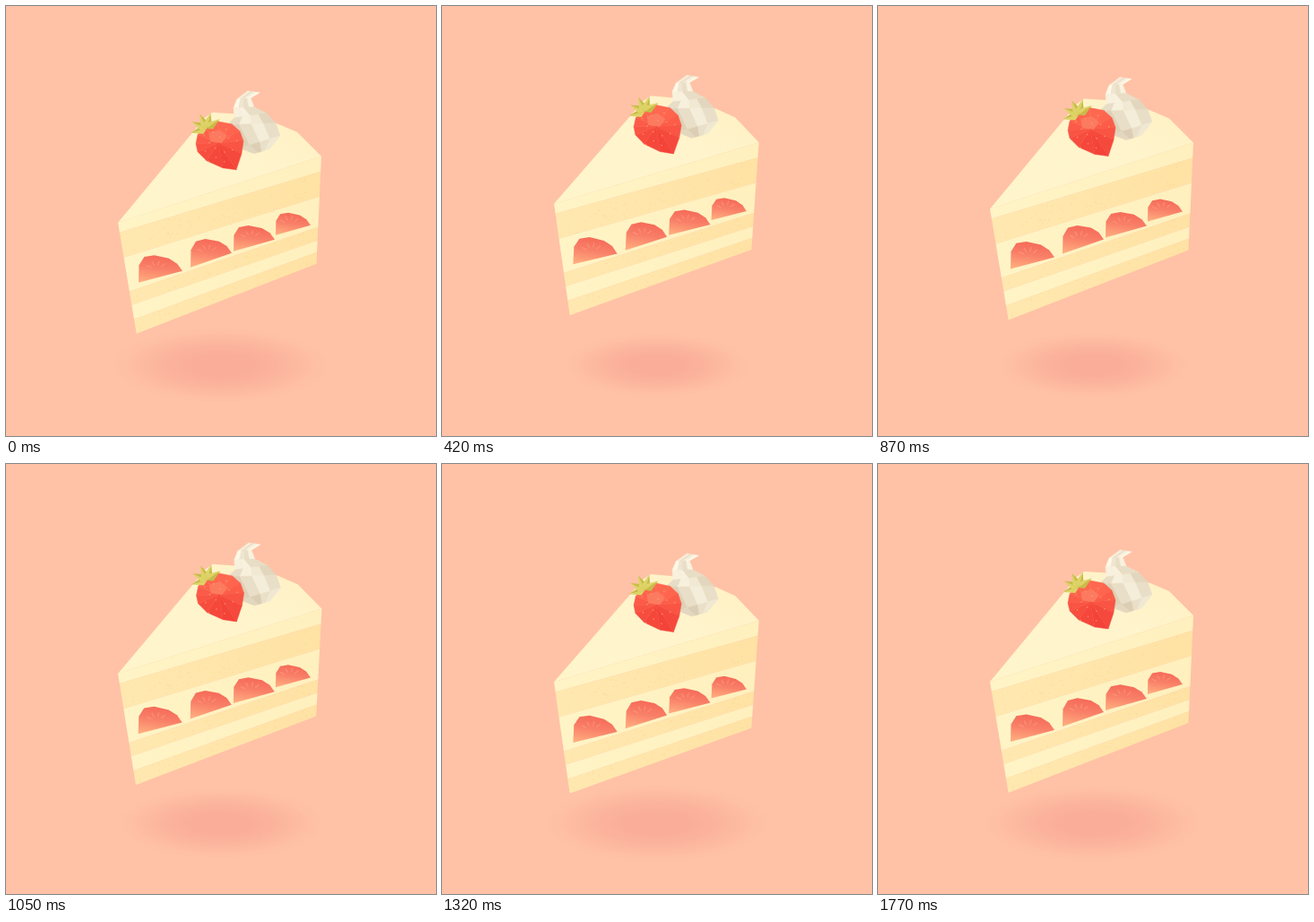
Write an HTML page that moves like this. It is 480 by 480 pixels and loops after 1800 ms.

```html
<!DOCTYPE html>
<html lang="en">
<head>
<meta charset="utf-8">
<title>Floating cake</title>
<style>
  html, body { margin: 0; width: 100%; height: 100%; overflow: hidden; background: #ffc2a6; }
  svg { display: block; width: 100%; height: 100%; }
</style>
</head>
<body>
<svg viewBox="0 0 480 480">
  <defs>
    <radialGradient id="shade">
      <stop offset="0" stop-color="#faad99"/>
      <stop offset=".3" stop-color="#faad99" stop-opacity=".94"/>
      <stop offset=".5" stop-color="#faad99" stop-opacity=".75"/>
      <stop offset=".7" stop-color="#faad99" stop-opacity=".42"/>
      <stop offset=".85" stop-color="#faad99" stop-opacity=".15"/>
      <stop offset="1" stop-color="#faad99" stop-opacity="0"/>
    </radialGradient>
    <linearGradient id="top" x1="0" y1="1" x2="1" y2="0">
      <stop offset="0" stop-color="#fff5cb"/>
      <stop offset=".6" stop-color="#fff4cc"/>
      <stop offset="1" stop-color="#fff0c3"/>
    </linearGradient>
    <linearGradient id="cream">
      <stop offset="0" stop-color="#fff4c6"/>
      <stop offset="1" stop-color="#fff0be"/>
    </linearGradient>
    <linearGradient id="sponge">
      <stop offset="0" stop-color="#ffe8b0"/>
      <stop offset="1" stop-color="#ffe2a4"/>
    </linearGradient>
    <linearGradient id="slice" x1=".6" y1="0" x2=".4" y2="1">
      <stop offset="0" stop-color="#f56857"/>
      <stop offset=".5" stop-color="#f98068"/>
      <stop offset="1" stop-color="#ffab7e"/>
    </linearGradient>
  </defs>
  <ellipse id="shadow" cx="240" cy="401" fill="url(#shade)"/>
  <g id="cake"></g>
</svg>
<script>
const LOOP = 1800, STEP = 30;
const cake = document.getElementById('cake');
const shadow = document.getElementById('shadow');
const parts = [];

const poly = (points, fill) =>
  parts.push(`<polygon points="${points.join(' ')}" fill="${fill}"/>`);
// Same-coloured outline hides the seams between neighbouring facets
const facet = (points, fill) =>
  parts.push(`<polygon points="${points.join(' ')}" fill="${fill}" stroke="${fill}" stroke-width=".5"/>`);
const dot = ([x, y], r, fill, opacity) =>
  parts.push(`<circle cx="${x}" cy="${y}" r="${r}" fill="${fill}" opacity="${opacity}"/>`);

const lerp = (a, b, u) => a.map((v, i) => v + (b[i] - v) * u);
const polar = ([x, y], deg, rx, ry = rx) => {
  const a = deg * Math.PI / 180;
  return [x + Math.cos(a) * rx, y + Math.sin(a) * ry];
};
const blend = (a, b, u) => `rgb(${lerp(a, b, u).map(Math.round)})`;

let seed = 7;
const rand = () => (seed = seed * 16807 % 2147483647) / 2147483647;

// Height of each layer boundary on the left and right edges of the cut face
const edges = [[241, 167], [252, 184], [280, 212], [318, 246], [333, 261], [349, 274], [365, 287]];
const left = y => [125 + (y - 241) / 6, y];
const right = y => [352 - (y - 167) / 22, y];

function layer(i) {
  const [l0, r0] = edges[i], [l1, r1] = edges[i + 1];
  const isSponge = i % 2 === 1;
  poly([left(l0), right(r0), right(r1), left(l1)], isSponge ? 'url(#sponge)' : 'url(#cream)');
  if (!isSponge) return;
  for (let n = (l1 - l0) * 2; n > 0; n--) {
    const v = .08 + rand() * .84;
    const [l, r] = lerp(edges[i], edges[i + 1], v);
    dot(lerp(left(l), right(r), rand()), .6, '#eac582', .4);
  }
}

// Half strawberry standing on a sloping base
function slice(x, y, w, rise, h) {
  const at = (u, v) => [x + u * w, y - u * rise - v * h];
  const dome = [[0, 0], [.01, .72], [.13, 1], [.36, .96], [.69, .67], [.88, .36], [1, 0]];
  poly(dome.map(p => at(...p)), 'url(#slice)');
  for (let deg = -150; deg < -30; deg += 35) {
    const core = at(.42, .3);
    parts.push(`<path d="M${polar(core, deg, 7, 6)}L${polar(core, deg, 13, 11)}" stroke="#ffb592" stroke-opacity=".45"/>`);
  }
}

// Swirl: facets between two profiles, shaded by a wave that winds downwards
function whippedCream() {
  const from = [[270, 94], [258, 103], [254, 113], [255, 124], [247, 132], [261, 158], [277, 164]];
  const to = [[283, 96], [273, 102], [277, 112], [291, 119], [301, 130], [306, 144], [294, 159]];
  const columns = 4;
  for (let k = 0; k < from.length - 1; k++) {
    for (let j = 0; j < columns; j++) {
      const a = j / columns, b = (j + 1) / columns;
      const shade = .2 + .3 * Math.sin(j * 1.6 - k * 1.2) + k * .09;
      facet([lerp(from[k], to[k], a), lerp(from[k], to[k], b),
             lerp(from[k + 1], to[k + 1], b), lerp(from[k + 1], to[k + 1], a)],
        blend([254, 249, 231], [217, 203, 176], Math.min(1, Math.max(0, shade))));
    }
  }
}

function strawberry() {
  const rim = [[212, 153], [214, 143], [221, 134], [236, 128], [252, 131], [261, 139], [265, 150],
               [263, 164], [257, 182], [242, 180], [224, 172], [214, 162]];
  const centre = [237, 152];
  rim.forEach((p, i) => {
    const next = rim[(i + 1) % rim.length];
    const light = .5 - (p[1] + next[1] - 2 * centre[1]) / 90;
    facet([centre, p, next], blend([245, 72, 60], [255, 104, 80], light));
  });
  poly([0, 1, 2, 3, 4].map(i => polar([236, 145], i * 72 - 80, 11, 8)), '#fc7b60');
  for (let i = 1; i < 15; i++)
    dot(polar([238, 154], i * 137.5, 5.6 * Math.sqrt(i), 6 * Math.sqrt(i)), .8, '#ffae76', .7);

  const stem = [224, 136];
  for (let deg = -196; deg <= -36; deg += 40) {
    const tip = polar(stem, deg, 18);
    poly([stem, polar(stem, deg - 42, 7), tip], '#ded366');
    poly([stem, polar(stem, deg + 42, 7), tip], '#c6bd48');
  }
}

poly([left(241), [222, 124], [230, 118], [262, 120], [304, 131], [325, 140], right(167)], 'url(#top)');
for (let i = 0; i < edges.length - 1; i++) layer(i);
slice(148, 308, 49, 13, 27);
slice(206, 291, 46, 16, 27);
slice(254, 273, 46, 13, 25);
slice(301, 255, 39, 11, 22);
whippedCream();
strawberry();
cake.innerHTML = parts.join('');

function draw(now) {
  const t = Math.floor((now % LOOP) / STEP) * STEP;
  const turn = 2 * Math.PI / LOOP;
  const lift = -6.2 - 14 * Math.cos(turn * (t - 600));
  const tilt = .7 * (1 - Math.cos(2 * turn * t));
  const size = 1 + lift * .008;
  cake.setAttribute('transform', `translate(0 ${lift.toFixed(3)}) rotate(${tilt.toFixed(3)} 240 240)`);
  shadow.setAttribute('rx', (121 * size).toFixed(2));
  shadow.setAttribute('ry', (42 * size).toFixed(2));
}

const start = performance.now();
function tick() {
  draw(performance.now() - start);
  requestAnimationFrame(tick);
}
tick();
</script>
</body>
</html>
```
